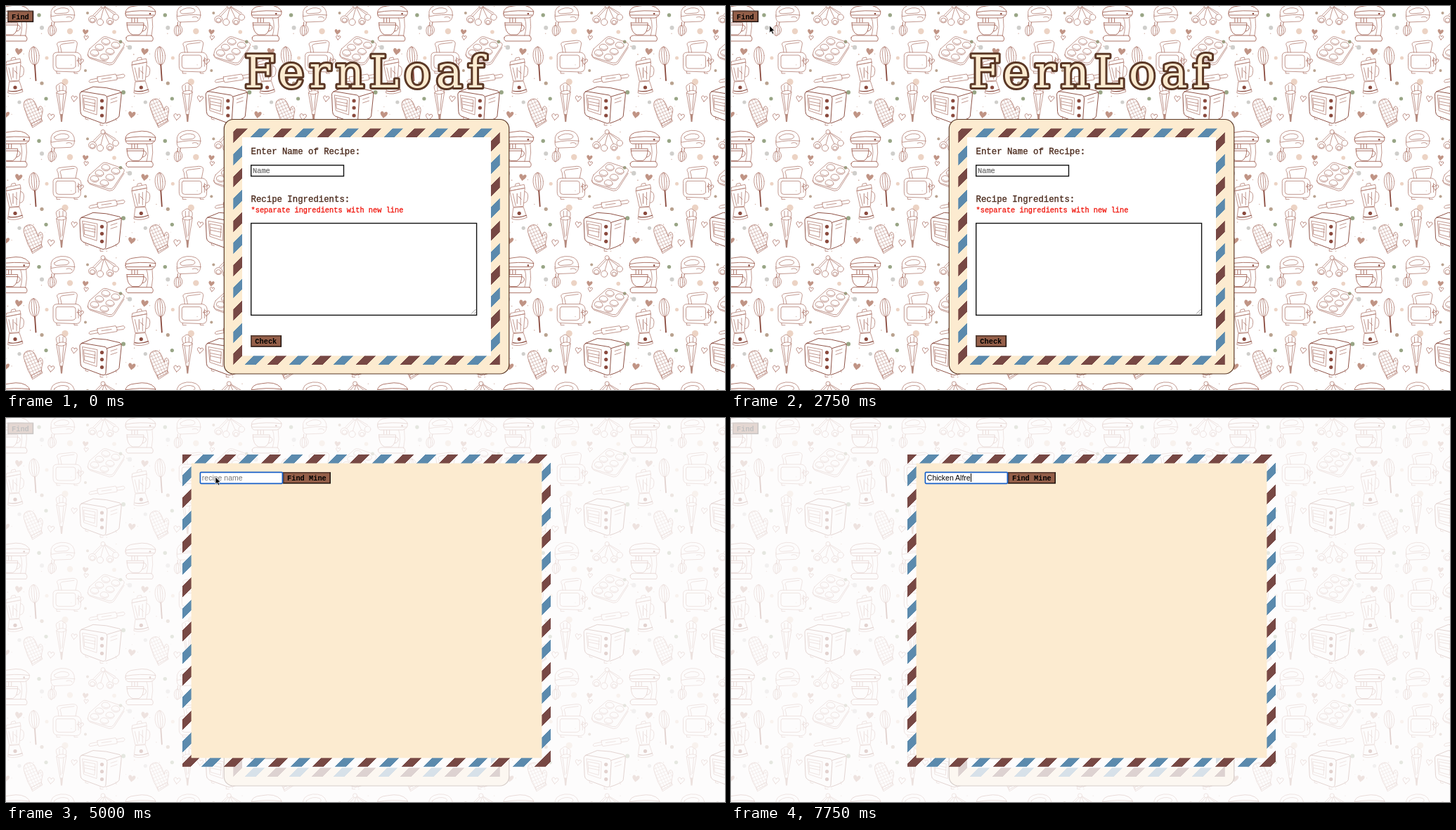
Recreate the animation shown at these times as an HTML page with a canvas. Size 1023 px wide and 547 px high, loop 8000 ms.

```html
<!DOCTYPE html>
<html lang="en">
<head>
<meta charset="utf-8">
<title>Recipe finder</title>
<style>
html, body { margin: 0; width: 100%; height: 100%; overflow: hidden; background: #fff; }
canvas, svg { position: absolute; left: 0; top: 0; display: block; }
text { white-space: pre; }
.mono { font-family: "Liberation Mono", "Courier New", monospace; font-size: 10.33px; }
.label { font-size: 12.35px; fill: #4c2b1d; stroke: #4c2b1d; stroke-width: .35px; }
.note { fill: #f0150c; stroke: #f0150c; stroke-width: .3px; }
.hint { fill: #666; stroke: #666; stroke-width: .2px; }
.bold { font-weight: bold; }
.sans { font-family: "Liberation Sans", Arial, sans-serif; font-size: 10.5px; }
.title { font: 64px "DejaVu Serif", serif; letter-spacing: 6.8px; fill: #fcebd0; stroke: #5b3826; stroke-width: 6px; stroke-linejoin: round; paint-order: stroke; }
.box { fill: #fff; stroke: #111; stroke-width: 1.4px; }
</style>
</head>
<body>
<canvas id="paper" width="1023" height="547"></canvas>
<svg width="1023" height="547" viewBox="0 0 1023 547">
  <defs>
    <linearGradient id="cardMail" gradientUnits="userSpaceOnUse" spreadMethod="repeat" x1="331.7" y1="187" x2="363.3" y2="218.6"></linearGradient>
    <linearGradient id="modalMail" gradientUnits="userSpaceOnUse" spreadMethod="repeat" x1="252.2" y1="64.5" x2="283.8" y2="96.1"></linearGradient>
  </defs>

  <g id="findBtn"></g>
  <text class="title" x="339" y="115.5">FernLoaf</text>

  <rect x="310.3" y="161.5" width="405.5" height="362.5" rx="13" fill="#fcebd0" stroke="#5b3826" stroke-width="1.2"/>
  <rect x="323.3" y="174.5" width="379.5" height="336.5" fill="url(#cardMail)"/>
  <rect x="336" y="187" width="354" height="311.3" fill="#fff"/>
  <text class="mono label" x="348.5" y="211">Enter Name of Recipe:</text>
  <rect class="box" x="348.7" y="226.8" width="131.8" height="15.6"/>
  <text class="mono hint" x="351" y="238.3">Name</text>
  <text class="mono label" x="348.5" y="279">Recipe Ingredients:</text>
  <text class="mono note" x="348.5" y="293.6">*separate ingredients with new line</text>
  <rect class="box" x="348.7" y="309.5" width="320.9" height="130.9"/>
  <path d="M662 438.5L668.3 432.2M666 438.5L668.3 436.2" stroke="#777" stroke-width=".8"/>
  <g id="checkBtn"></g>

  <g id="modal">
    <rect width="1023" height="547" fill="#fdfcfc" fill-opacity=".77"/>
    <rect x="251" y="52" width="524" height="444.8" fill="url(#modalMail)"/>
    <rect x="263.6" y="64.5" width="498.8" height="419.8" fill="#fcebd0"/>
    <g id="mineBtn"></g>
    <rect id="field" fill="#fff"/>
    <text id="query" class="sans" x="278.8" y="89"></text>
    <rect id="caret" y="79" width="1" height="12" fill="#000"/>
  </g>
  <path id="pointer" d="M0 0V10.2L2.4 8L4.1 12L5.9 11.2L4.2 7.4H7.3Z" fill="#000" stroke="#fff" stroke-width=".7"/>
</svg>
<script>
const $ = id => document.getElementById(id);

// ---------- wallpaper ----------
const ctx = $('paper').getContext('2d');
const P = 179.3;
const INK = '#b37f74', DARK = '#8a4a3e';

function line(d, width = .8, color = INK) {
  ctx.strokeStyle = color;
  ctx.lineWidth = width;
  ctx.stroke(new Path2D(d));
}
function blob(d, color = DARK) {
  ctx.fillStyle = color;
  ctx.fill(new Path2D(d));
}
function oval(x, y, rx, ry = rx, turn = 0, fill) {
  ctx.beginPath();
  ctx.ellipse(x, y, rx, ry, turn, 0, 7);
  if (fill) { ctx.fillStyle = fill; ctx.fill(); return; }
  ctx.strokeStyle = INK;
  ctx.lineWidth = .8;
  ctx.stroke();
}
function heart(x, y, r, filled) {
  ctx.save();
  ctx.translate(x, y);
  ctx.rotate(.15);
  ctx.scale(r, r);
  const d = 'M0 1C-.5 .4-1.2 0-1-.6C-.8-1.1-.1-1 0-.4C.1-1 .9-1.1 1-.6C1.1 0 .4 .5 0 1Z';
  filled ? blob(d, '#c09485') : line(d, .9 / r);
  ctx.restore();
}

function standMixer() {
  line('M170 11Q169 1 184 0Q204-4 212 6Q215 14 206 17H174Q170 16 170 11ZM170 9Q190 5 213 8M171 13H211', .9, '#a4675a');
  line('M179 17V23M187 17V23M183 17V23', 1.1);
  line('M172 24H196Q196 38 189 41H180Q172 38 172 24ZM172 27H196M196 27Q201 28 199 33Q197 36 194 36', .9, '#a4675a');
  line('M200 17Q204 28 200 42M208 16Q210 30 207 43');
  line('M171 45Q172 41 180 42H207Q211 46 208 50H173Q170 48 171 45Z', .9, '#a4675a');
  oval(205, 11, 1.3, 1.3, 0, DARK);
}
function handMixer() {
  line('M64 13Q62 0 78-2Q94-3 97 8Q99 19 92 22L68 23Q63 21 64 13Z');
  line('M69 7Q78 0 88 4Q92 8 86 10L72 11Q67 10 69 7ZM64 15Q82 11 98 13M86 16Q91 14 94 17');
  line('M65 23V28M69 23L68 28', 1.1);
  oval(64.5, 35, 4.5, 7.5); oval(64.5, 35, 1.8, 7.5);
  line('M69 28Q75 35 68 41');
}
function spoons() {
  oval(138, 0, 3);
  line('M137 3L126 15M139 3L135 18M140 2L147 17M141 2L154 12M135 2L124 13M141 1L156 10');
  oval(123, 19, 5.5, 5); oval(123, 20, 3.5, 3);
  oval(134, 23, 4.6); oval(148, 22, 4.8); oval(156, 16, 4.3); oval(148, 23, 3, 2.6);
}
function muffinPan() {
  line('M119 61L137 45Q139 43 143 44L166 52Q170 54 167 58L153 79Q151 82 146 81L119 73Q114 70 119 61Z');
  line('M116 69Q117 74 121 75L147 84Q152 84 154 81L168 59');
  for (const [x, y] of [[142, 51], [156, 56], [133, 59], [148, 65], [126, 67], [140, 73]]) {
    oval(x, y, 6, 4.6, .2);
    line(`M${x - 4} ${y + 1}q4 4 8 1`, .7);
  }
}
function toaster() {
  line('M67 73Q66 66 73 66H100Q107 67 107 75L106 90Q105 94 100 94L72 93Q67 92 67 86Z');
  line('M75 66L74 58Q70 52 77 51L95 49Q103 49 101 56L99 66M79 66L78 60Q75 55 81 54L97 52M73 70H96Q99 70 99 74V86Q98 89 94 89H75Q71 89 71 85V73Q71 70 73 70');
  line('M103 73V86M101 78H105M72 93V96H77M97 94V96H102');
}
function whisk() {
  oval(40, 71, 7.2, 13, -.08); oval(40, 71, 3.6, 13, -.08);
  line('M39.5 58L41 85');
  line('M41 84L42.5 106', 1.8, DARK);
}
function blender() {
  line('M0 84L21 80L19 106L5 107ZM1 79L20 75L21 80L0 84ZM7 77L8 74L13 73L14 76M21 85Q27 86 25 96Q24 101 20 101');
  line('M5 108L19 107L24 122Q12 127 3 124ZM4 88L8 105M15 86V104');
  line('M10 88V102M12 92L16 96', 1);
  oval(13, 116, 2.6, 2.6, 0, DARK);
  line('M4 121Q13 123 23 119', 1.2, DARK);
}
function rollingPin() {
  line('M130 101L156 97Q159 101 158 105L132 109Q129 105 130 101ZM130 103L120 105Q116 108 120 109L131 107M157 99L167 97Q171 99 167 102L158 103M136 104L150 102');
}
function oven() {
  line('M105 128Q104 121 111 122L141 127Q144 128 144 132L142 163Q142 168 137 167L110 157Q106 155 106 151Z', .95, DARK);
  line('M107 122L124 115Q142 115 162 121Q165 123 164 128L161 157Q160 161 142 167M144 129L164 123', .95, DARK);
  line('M109 127L130 131L129 155L111 149ZM111 131L127 134L126 150L112 146ZM112 140L127 143M112 136L127 139');
  line('M149 133L158 130M149 138L158 135M113 158L113 161L117 162M134 167V170H138M156 160L157 163');
  for (const y of [135, 145, 156]) oval(136.5, y, 2.6, 2.6, 0, DARK);
}
function pipingBag() {
  line('M72 123Q79 118 86 122L80.5 155H77.5ZM73 122Q69 113 74 112Q79 107 82 112Q88 113 85 122M76 121L76 113M81 120L81 113M75 126L78 150M82 125L80 148M72 124Q80 128 86 123');
  blob('M77 154H81L80 165H78Z', '#b58a7e');
}
function mitt() {
  const d = 'M27 148Q22 136 30 133Q38 130 42 139L46 149Q46 142 50 143Q54 146 51 155L50 164L37 171Q30 160 27 148Z';
  line(d);
  ctx.save();
  ctx.clip(new Path2D(d));
  for (let k = 0; k < 16; k++) line(`M${5 + k * 4.5} 130l22 46M5 ${120 + k * 5}l60-25`, .45);
  ctx.restore();
  line('M36 168L50 160L52 164L38 173Z');
}

let seed = 11;
const rnd = () => (seed = seed * 16807 % 2147483647) / 2147483647;
const specks = Array.from({ length: 20 }, () => [rnd() * P, rnd() * P, .4 + rnd() * .5]);

function bits() {
  for (const [x, y, r] of specks) oval(x, y, r, r, 0, '#d3b4a9');
  const dots = {
    '#98a585': [[47, 13, 2.7], [163, 51, 2.4], [167, 123, 3], [57, 132, 2.6]],
    '#cfcecb': [[51, 31, 3], [176, 59, 3.2], [19, 137, 2.6]],
    '#ecd3c4': [[91, 36, 4.2], [84, 108, 4.6], [154, 37, 2.8], [58, 74, 2.5]],
    '#b9a28f': [[116, 10, 2], [113, 92, 2], [51, 110, 2.6]]
  };
  for (const color in dots) for (const [x, y, r] of dots[color]) oval(x, y, r, r, 0, color);
  heart(18, 65, 5, true); heart(113, 37, 4, true); heart(179, 155, 5, true);
  heart(106, 79, 4); heart(97, 132, 4); heart(64, 158, 4.5); heart(114, 45, 3);
}

const items = [bits, standMixer, handMixer, spoons, muffinPan, toaster, whisk, blender, rollingPin, oven, pipingBag, mitt];
ctx.fillStyle = '#fff';
ctx.fillRect(0, 0, 1023, 547);
ctx.lineJoin = ctx.lineCap = 'round';
for (let i = -1; i < 6; i++) for (let j = -1; j < 4; j++) {
  ctx.save();
  ctx.translate(i * P, j * P);
  items.forEach(draw => draw());
  ctx.restore();
}

// ---------- interface ----------
const RED = '#774844', BLUE = '#5b8aad';
const stop = (at, color, alpha) => `<stop offset="${at}" stop-color="${color}" stop-opacity="${alpha}"/>`;
const band = (from, color) => stop(from, color, 0) + stop(from, color, 1) + stop(from + .25, color, 1) + stop(from + .25, color, 0);
for (const id of ['cardMail', 'modalMail']) $(id).innerHTML = band(.25, BLUE) + band(.75, RED);

function button(id, x, y, w, h, label) {
  $(id).innerHTML = `<rect x="${x}" y="${y}" width="${w}" height="${h}" fill="#1d100b"/>
    <path d="M${x} ${y + h}V${y}H${x + w}L${x + w - 1.5} ${y + 1.5}H${x + 1.5}V${y + h - 1.5}Z" fill="#5a4036"/>
    <rect x="${x + 1.5}" y="${y + 1.5}" width="${w - 3}" height="${h - 3}" fill="#945f49"/>
    <text class="mono bold" x="${x + 6}" y="${y + 12}">${label}</text>`;
}
button('findBtn', 2, 6.7, 37.2, 16.4, 'Find');
button('checkBtn', 348.3, 469, 43.8, 16.8, 'Check');
button('mineBtn', 394, 77, 68, 16.6, 'Find Mine');

// ---------- motion ----------
const STEP = 250, LOOP = 8000;
const route = [[1000, 293, 402], [1500, 160, 165], [2000, 57, 1], [2250, 83, 40], [3250, 26.7, 16], [3500, 26.7, 16], [4500, 298, 84]];
const typed = [[5750, 'Ch'], [6000, 'Chic'], [6250, 'Chicke'], [6500, 'Chicken '], [6750, 'Chicken A'], [7500, 'Chicken Alf'], [7750, 'Chicken Alfre']];
const pen = document.createElement('canvas').getContext('2d');
pen.font = '10.5px "Liberation Sans", Arial, sans-serif';

function place(t) {
  const k = route.findIndex(p => p[0] > t);
  if (k < 0) return route[route.length - 1].slice(1);
  const [t0, x0, y0] = route[k - 1], [t1, x1, y1] = route[k];
  const u = (t - t0) / (t1 - t0), e = t0 === 3500 ? u * u * (3 - 2 * u) : u;
  return [x0 + (x1 - x0) * e, y0 + (y1 - y0) * e];
}
function set(el, attrs) {
  for (const name in attrs) el.setAttribute(name, attrs[name]);
}
const show = (el, on) => el.setAttribute('visibility', on ? 'visible' : 'hidden');

function render(t) {
  const moving = t >= 1000 && t < 5750;
  show($('pointer'), moving);
  if (moving) set($('pointer'), { transform: `translate(${place(t)})` });

  const open = t >= 3500, focus = t >= 4500;
  $('modal').style.display = open ? '' : 'none';
  set($('field'), focus
    ? { x: 276.4, y: 77.4, width: 117, height: 15.9, rx: 1.2, stroke: '#1861c9', 'stroke-width': 1.7 }
    : { x: 276.3, y: 77.4, width: 117.6, height: 15.8, rx: 0, stroke: '#85817c', 'stroke-width': 1 });

  const value = typed.reduce((s, [at, word]) => t >= at ? word : s, '');
  $('query').textContent = value || 'recipe name';
  set($('query'), { fill: value ? '#000' : '#757575' });
  const blink = t >= 5000 && t < 5500 || t >= 7250 && t < 7500;
  show($('caret'), focus && !blink);
  set($('caret'), { x: Math.round(278.8 + pen.measureText(value).width) });
}

let last = -1;
const start = performance.now();
function tick() {
  const t = Math.floor((performance.now() - start) % LOOP / STEP) * STEP;
  if (t !== last) render(last = t);
  requestAnimationFrame(tick);
}
tick();
</script>
</body>
</html>
```
